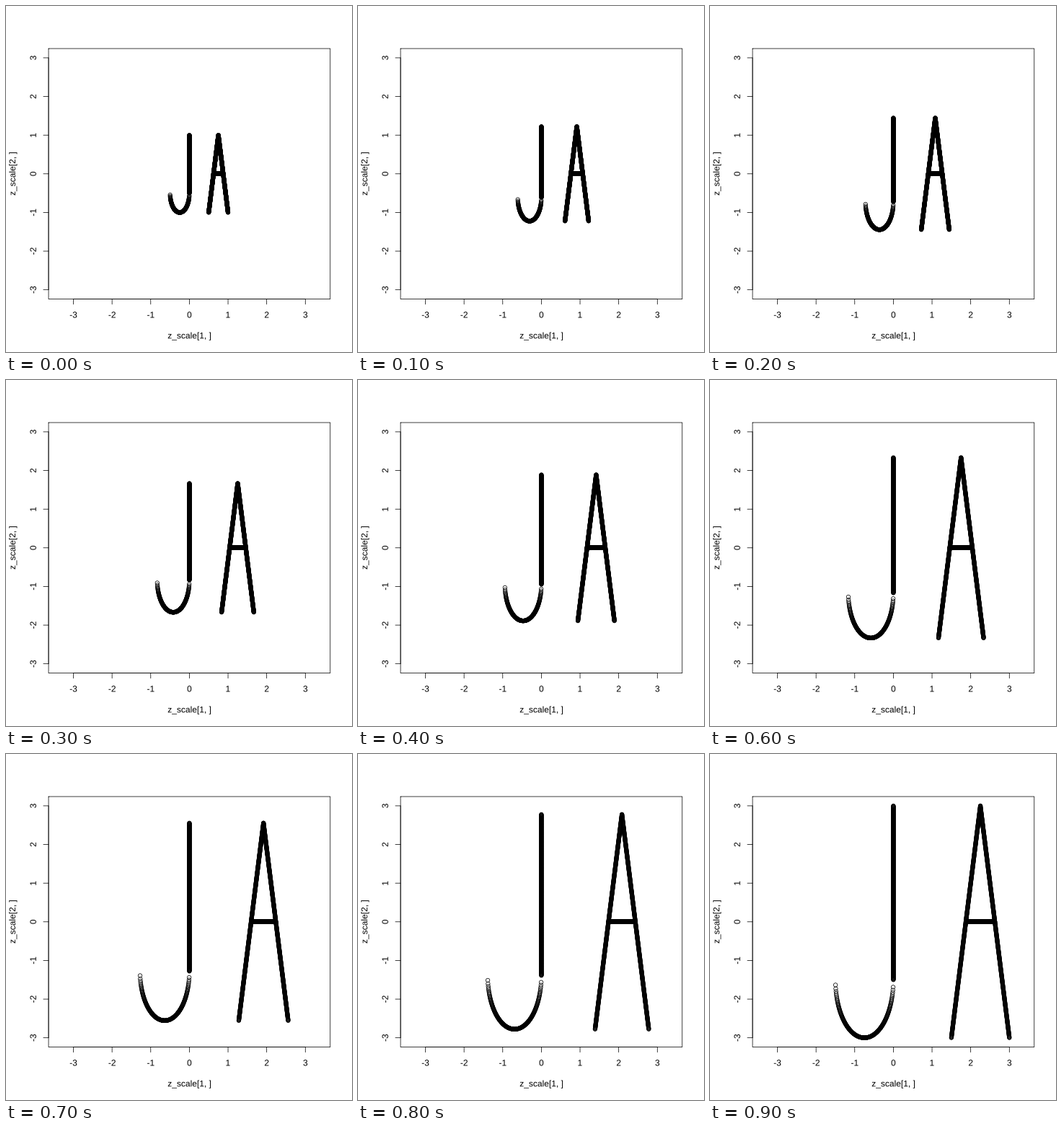
These frames come from a looping animation (480x480 px, 1 s). A matplotlib script:

```python
import numpy as np
import matplotlib.pyplot as plt
from matplotlib.animation import FuncAnimation
from matplotlib.patches import PathPatch
from matplotlib.textpath import TextPath
from matplotlib.transforms import Affine2D

SIZE = 480
FRAMES = 10
LINE = 14.4          # height of one margin line
LINE_WIDTH = 0.75
TICK = LINE / 2
LEFT, RIGHT = 4.1 * LINE, SIZE - 2.1 * LINE
TOP, BOTTOM = 4.1 * LINE, SIZE - 5.1 * LINE
CX, CY = (LEFT + RIGHT) / 2, (TOP + BOTTOM) / 2
UNIT = (BOTTOM - TOP) / 6.48  # pixels per data unit

plt.rcParams["font.family"] = "Liberation Sans"


def segment(start, end, count=500):
    return np.linspace(start, end, count)


def letters():
    """Points of the unit-sized J and A."""
    hook_x = np.linspace(-0.499, -0.002, 249)
    hook_y = -0.5 - 0.5 * np.sqrt(1 - ((hook_x + 0.25) / 0.25) ** 2)
    return np.vstack([
        segment((0, -0.5), (0, 1)),
        np.column_stack([hook_x, hook_y]),
        segment((0.5, -1), (0.75, 1)),
        segment((0.75, 1), (1, -1)),
        segment((0.625, 0), (0.875, 0)),
    ])


def to_pixels(points):
    return np.array([CX, CY]) + points * [UNIT, -UNIT]


# One point equals one pixel at 72 dpi.
fig = plt.figure(figsize=(SIZE / 72, SIZE / 72), dpi=72, facecolor="white")
ax = fig.add_axes([0, 0, 1, 1])
ax.set(xlim=(0, SIZE), ylim=(SIZE, 0))
ax.axis("off")


def line(xs, ys):
    ax.plot(xs, ys, color="black", lw=LINE_WIDTH, snap=False,
            solid_capstyle="round", solid_joinstyle="round")


def label(x, y, text, angle=0):
    """Text centred on x, y along its baseline, at subpixel position."""
    path = TextPath((0, 0), text, size=12)
    bounds = path.get_extents()
    place = (Affine2D().translate(-(bounds.x0 + bounds.x1) / 2, 0)
             .scale(1, -1).rotate_deg(-angle).translate(x, y))
    ax.add_patch(PathPatch(place.transform_path(path), facecolor="black",
                           linewidth=0, snap=False))


line([LEFT, RIGHT, RIGHT, LEFT, LEFT], [TOP, TOP, BOTTOM, BOTTOM, TOP])

ticks = np.arange(-3, 4)
tick_x, tick_y = to_pixels(np.column_stack([ticks, ticks])).T
line(tick_x[[0, -1]], [BOTTOM, BOTTOM])
line([LEFT, LEFT], tick_y[[0, -1]])
for value, x, y in zip(ticks, tick_x, tick_y):
    line([x, x], [BOTTOM, BOTTOM + TICK])
    line([LEFT - TICK, LEFT], [y, y])
    label(x, BOTTOM + 1.8 * LINE, str(value))
    label(LEFT - 1.2 * LINE, y, str(value), 90)

label(CX, BOTTOM + 3.8 * LINE, "z_scale[1, ]")
label(LEFT - 3.2 * LINE, CY, "z_scale[2, ]", 90)

shape = letters()
rings = ax.scatter(*to_pixels(shape).T, s=5.4 ** 2, facecolors="none",
                   edgecolors="black", linewidths=LINE_WIDTH, zorder=3)
rings.set_snap(False)


def update(frame):
    scale = 1 + 2 * frame / (FRAMES - 1)
    rings.set_offsets(to_pixels(shape * scale))
    return rings,


anim = FuncAnimation(fig, update, frames=FRAMES, interval=100,
                     repeat=True, repeat_delay=0)
plt.show()
```
